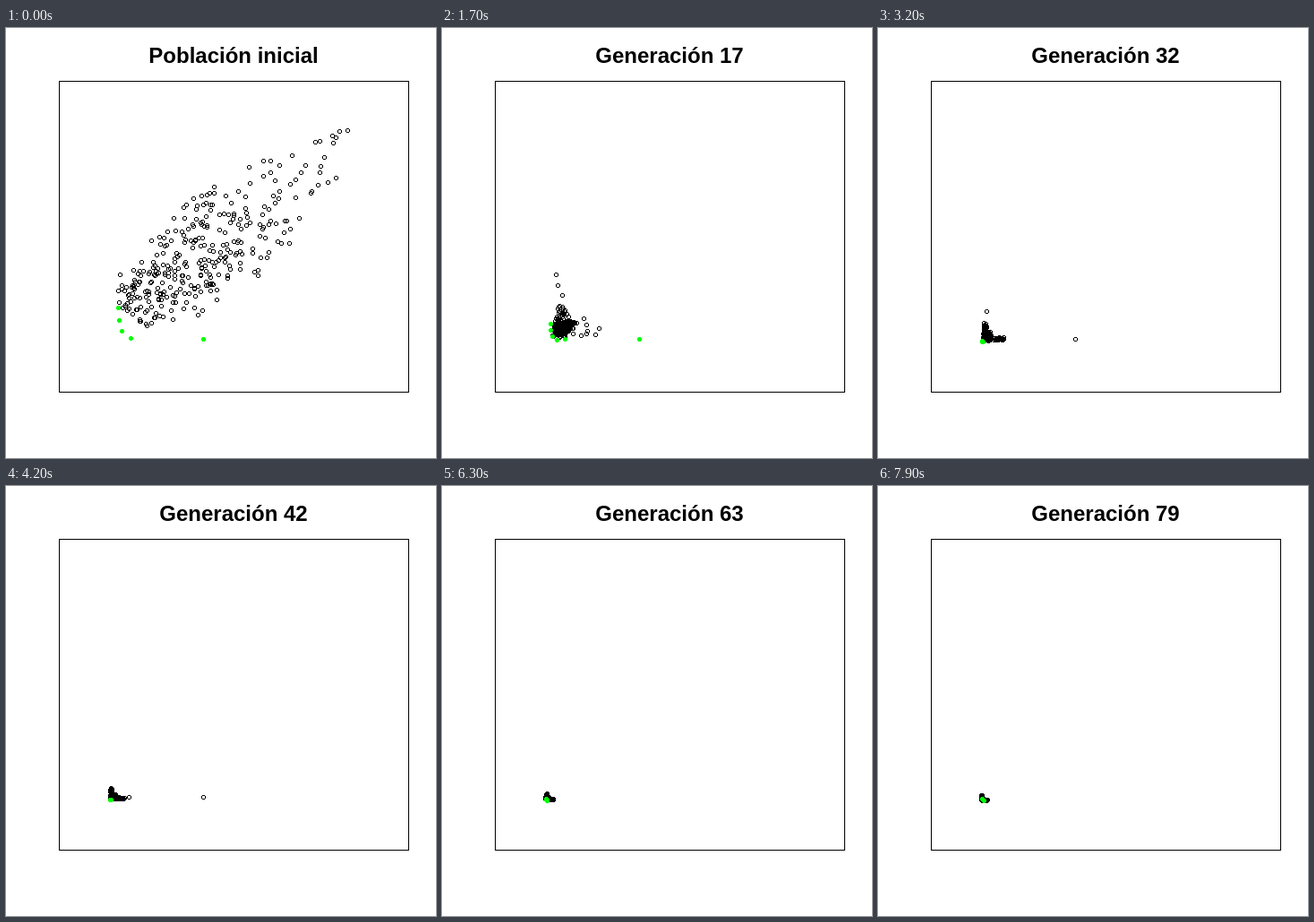
Write an HTML page that moves like this. It is 480x480 px and loops after 8000 ms.

```html
<!DOCTYPE html>
<html lang="es">
<head>
<meta charset="utf-8">
<title>Población</title>
<style>
  html, body { margin: 0; width: 100%; height: 100%; overflow: hidden; background: #fff; }
  svg { display: block; width: 100vw; height: 100vh; }
  text { font: bold 24px "Liberation Sans", Arial, sans-serif; text-anchor: middle; }
</style>
</head>
<body>
<svg viewBox="0 0 480 480">
  <rect width="480" height="480" fill="#fff"/>
  <rect x="59.5" y="59.5" width="390" height="347" fill="none" stroke="#000"/>
  <text id="title" x="254" y="39"></text>
  <path id="rings" shape-rendering="crispEdges"/>
  <path id="dots" shape-rendering="crispEdges" fill="#0f0"/>
</svg>
<script>
const STEP = 100, GENERATIONS = 80, POPULATION = 320;
const CLUSTERED = 8, CORNERED = 17;

// Long-lived individuals; those with optimalUntil are green up to that generation
const SURVIVORS = [
  { x: 220, y: 347, until: 50, optimalUntil: 28 },
  { x: 137, y: 347, from: 6, until: 50, optimalUntil: 25 },
  { x: 127, y: 275, until: 22 },
  { x: 129, y: 287, until: 20 },
  { x: 219, y: 315, until: 11 },
  { x: 121, y: 316, from: 24, until: 37 }
];

const mix = (a, b, p) => a.map((v, i) => v + (b[i] - v) * p);

function randoms(seed) {
  let s = Math.imul(seed + 1, 0x9E3779B1);
  return Array.from({ length: 5 }, () => {
    s = (s + 0x6D2B79F5) | 0;
    let t = Math.imul(s ^ (s >>> 15), 1 | s);
    t = (t + Math.imul(t ^ (t >>> 7), 61 | t)) ^ t;
    return ((t ^ (t >>> 14)) >>> 0) / 2 ** 32;
  });
}

// Lens-shaped cloud along a rising axis, thinning out at its far end
function cloud([, a, b, c]) {
  const along = .03 + .6 * a + .37 * a ** 14;
  const halfWidth = 62 * (4 * along * (1 - along)) ** .4;
  const across = halfWidth * (1.4 * b + .6 * c - 1);
  return [
    Math.max(125, 128 + 257 * along + .63 * across),
    325 - 207 * along + .78 * across
  ];
}

// Bent ridge with a sparse column above and loose points around it
function cluster([kind, a, b, c, d]) {
  if (kind < .08) return [156 - 18 * a * b, 264 + 46 * c];
  if (kind < .3) {
    const dx = 62 * a * b;
    return [125 + dx, 302 + .3 * dx + (40 - .55 * dx) * c];
  }
  const x = 128 + 23 * (a + b);
  return [x, Math.max(338 - .9 * (x - 128), 314) + 13 * (c + d - 1)];
}

// Compact core with an upward and a rightward arm, all shrinking into the corner
function corner([kind, a, b, c, d], generation) {
  const k = Math.exp((CORNERED - generation) / 15);
  const x = 115 + 7 * k ** 1.5, y = 351 - 5 * k, size = 3 + 17 * k;
  const armShare = .9 - .78 * Math.sqrt(k);
  const inset = size * (.1 + .3 * b);
  if (kind < armShare / 2) return [x + inset, y - size / 2 - (4 + 26 * k) * a * a];
  if (kind < armShare) return [x + size / 2 + (5 + 37 * k) * a * a, y - inset];
  return [x + size * (a + b) / 2, y - size * (c + d) / 2];
}

// Each individual is replaced every third generation
function individual(i, generation) {
  const birth = Math.max(0, generation - (generation + i) % 3);
  const r = randoms(i * 131 + birth);
  r[1] = (i + r[1]) / POPULATION;
  if (birth <= CLUSTERED) return mix(cloud(r), cluster(r), 1 - (1 - birth / CLUSTERED) ** 2);
  if (birth < CORNERED) {
    const p = (birth - CLUSTERED) / (CORNERED - CLUSTERED);
    return mix(cluster(r), corner(r, CORNERED), p * Math.sqrt(p));
  }
  return corner(r, birth);
}

// Best individuals: a curve that opens and closes while it moves into the corner
function front(generation) {
  const decay = Math.exp(-((generation / 20) ** 3));
  const spread = decay * (1 + Math.cos(generation * Math.PI / 9)) / 2;
  const drift = 2.2 * (generation / GENERATIONS) ** 2;
  return [0, 1 / 3, 2 / 3, 1].map(p => [
    116 + 9 * decay + 14 * spread * p ** 3 + drift * p,
    350 - 4 * decay - 34 * spread * (1 - p) ** 1.3 + drift * (p - .5)
  ]);
}

const place = ([x, y], dx, dy) => `M${Math.round(x) + dx} ${Math.round(y) + dy}`;
const ring = p => place(p, -1, -2) + "h3v1h-3zm0 4h3v1h-3zm-1-3h1v3h-1zm4 0h1v3h-1z";
const dot = p => place(p, -1, -2) + "h3v1h1v3h-1v1h-3v-1h-1v-3h1z";

const [title, rings, dots] = ["title", "rings", "dots"].map(id => document.getElementById(id));
let shown = -1;

function draw(generation) {
  const dominated = Array.from({ length: POPULATION }, (_, i) => individual(i, generation));
  const optimal = front(generation);
  for (const { x, y, from = 0, until, optimalUntil = 0 } of SURVIVORS) {
    if (generation < from || generation >= until) continue;
    (generation < optimalUntil ? optimal : dominated).push([x, y]);
  }
  title.textContent = generation ? `Generación ${generation}` : "Población inicial";
  rings.setAttribute("d", dominated.map(ring).join(""));
  dots.setAttribute("d", optimal.map(dot).join(""));
}

const start = performance.now();
function tick() {
  const generation = Math.floor((performance.now() - start) / STEP) % GENERATIONS;
  if (generation !== shown) draw(shown = generation);
  requestAnimationFrame(tick);
}
tick();
</script>
</body>
</html>
```
